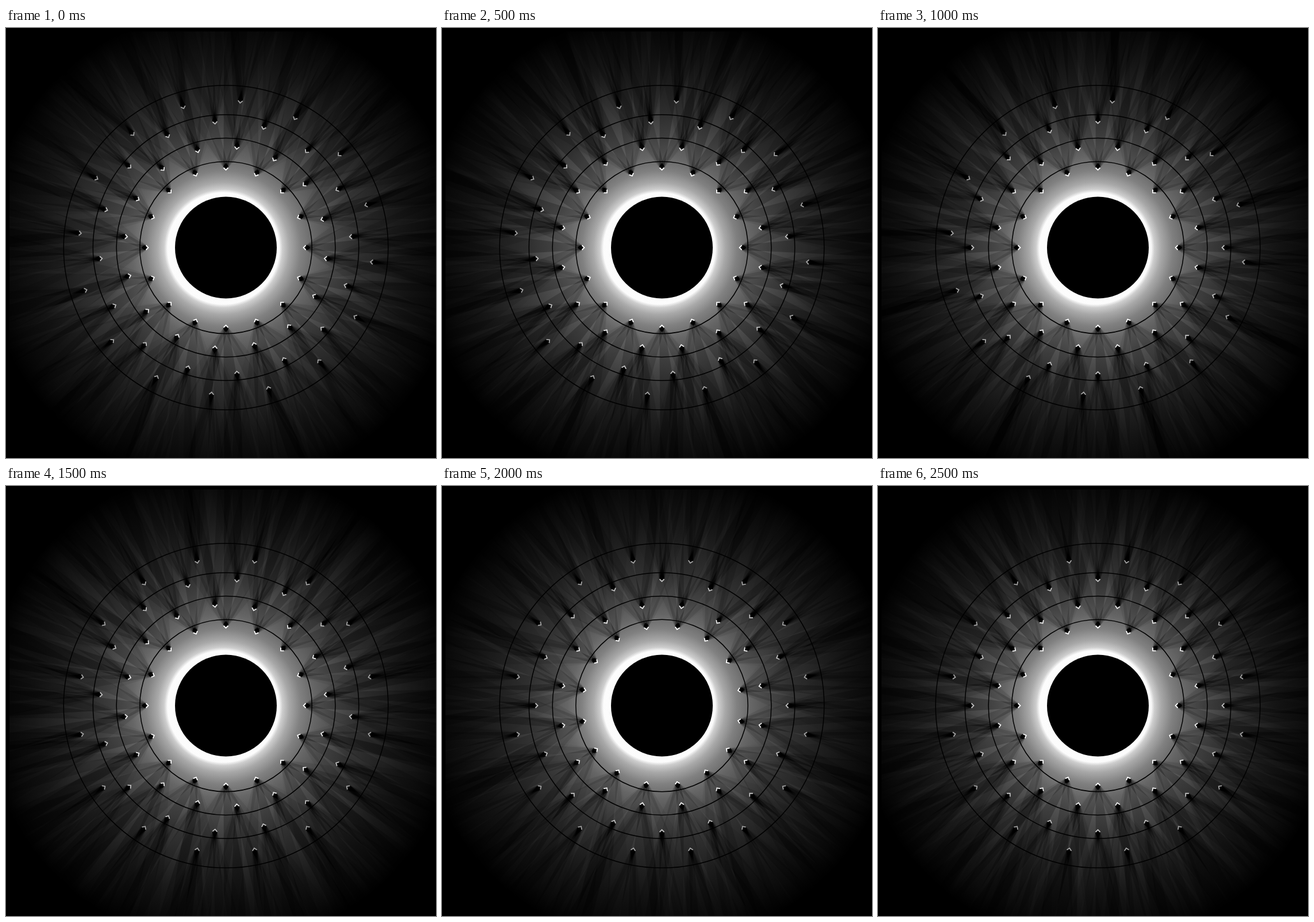
These frames come from a looping animation (748x748 px, 3 s). An HTML page with a canvas:

```html
<!DOCTYPE html>
<html>
<head>
<meta charset="utf-8">
<style>
html, body { margin: 0; width: 100%; height: 100%; overflow: hidden; background: #000; }
canvas { display: block; }
</style>
</head>
<body>
<canvas id="stage" width="748" height="748"></canvas>
<script>
const SIZE = 748, CX = 382.5, CY = 382, STEP = 500, COUNT = 16;
const DEG = Math.PI / 180;

// line: circle radius, tip: marker distance, turns: offset in degrees per step
const rings = [
  { line: 149.7, tip: 134.2, tone: '#fff', turns: [0, 0, 0, 0, 11.25, 0] },
  { line: 190.4, tip: 171.6, tone: '#ececec', turns: [6.25, 11.25, 11.25, -6.25, 11.25, 11.25] },
  { line: 231.2, tip: 215.2, tone: '#c0c0c0', turns: [-5, -5, 0, 5, 0, 0] },
  { line: 282.3, tip: 252, tone: '#a4a4a4', turns: [5.625, 5.625, 5.625, 11.25, 11.25, 11.25] }
];

// brightness of the glow by radius
const glow = [[0, 255], [97, 255], [103, 208], [115, 170], [135, 130], [160, 103],
  [190, 83], [231, 62], [282, 44], [330, 27], [375, 14], [415, 0]];

// point lights on the rim of the disc, each shining outward over a wide lobe
const LIGHTS = 24, GLOW_X = 378, GLOW_Y = 383.5, RIM = 88;
const LOBE = 60 / 360, PEAK = Math.floor(255 / (LIGHTS * LOBE));
const lights = Array.from({ length: LIGHTS }, (_, i) => {
  const a = i * 2 * Math.PI / LIGHTS;
  return { a, x: GLOW_X + RIM * Math.cos(a), y: GLOW_Y + RIM * Math.sin(a) };
});

function makeCanvas() {
  const c = document.createElement('canvas');
  c.width = c.height = SIZE;
  return c;
}

function fillAll(g, style, mode = 'source-over') {
  g.globalCompositeOperation = mode;
  g.fillStyle = style;
  g.fillRect(0, 0, SIZE, SIZE);
  g.globalCompositeOperation = 'source-over';
}

function circle(g, r) {
  g.beginPath();
  g.arc(CX, CY, r, 0, 2 * Math.PI);
}

function markersAt(step) {
  return rings.flatMap(({ tip, tone, turns }) =>
    Array.from({ length: COUNT }, (_, i) =>
      ({ tip, tone, angle: (turns[step] + i * 360 / COUNT) * DEG })));
}

// x runs across the marker, d is its distance from the centre
function place(angle, x, d) {
  const s = Math.sin(angle), c = Math.cos(angle);
  return [CX + x * c + d * s, CY + x * s - d * c];
}

function lobe(g, { a }) {
  const shade = g.createConicGradient(a, GLOW_X, GLOW_Y);
  const lit = `rgb(${PEAK},${PEAK},${PEAK})`;
  shade.addColorStop(0, lit);
  shade.addColorStop(LOBE, '#000');
  shade.addColorStop(1 - LOBE, '#000');
  shade.addColorStop(1, lit);
  return shade;
}

function castShadows(g, light, markers) {
  const far = ([x, y]) => [x + (x - light.x) * 16, y + (y - light.y) * 16];
  g.fillStyle = '#000';
  g.beginPath();
  for (const { angle, tip } of markers) {
    // only markers on the light's own side can shade its lobe
    if (Math.cos(angle - Math.PI / 2 - light.a) < 0.25) continue;
    const a = place(angle, -4.2, tip + 5), b = place(angle, 4.2, tip + 5);
    g.moveTo(...a);
    g.lineTo(...b);
    g.lineTo(...far(b));
    g.lineTo(...far(a));
    g.closePath();
  }
  g.fill();
}

const body = new Path2D('M0 -1L4 -5L3.6 -9L0 -12L-3.6 -9L-4 -5Z');
const tipLine = new Path2D('M-4 -4.8L0 -0.8L4 -4.8');

function drawMarker(g, { angle, tip, tone }) {
  g.save();
  g.translate(CX, CY);
  g.rotate(angle);
  g.translate(0, -tip);
  g.fillStyle = '#000';
  g.fill(body);
  g.strokeStyle = tone;
  g.lineWidth = 1.8;
  g.stroke(tipLine);
  g.restore();
}

const layer = makeCanvas(), lg = layer.getContext('2d');

function render(step) {
  const canvas = makeCanvas(), g = canvas.getContext('2d');
  const markers = markersAt(step);

  // add up how much of the light reaches each place
  fillAll(g, '#000');
  for (const light of lights) {
    fillAll(lg, lobe(lg, light));
    castShadows(lg, light, markers);
    g.globalCompositeOperation = 'lighter';
    g.drawImage(layer, 0, 0);
  }

  const edge = glow[glow.length - 1][0];
  const shade = g.createRadialGradient(GLOW_X, GLOW_Y, 0, GLOW_X, GLOW_Y, edge);
  for (const [r, v] of glow) shade.addColorStop(r / edge, `rgb(${v},${v},${v})`);
  fillAll(g, shade, 'multiply');

  g.strokeStyle = '#000';
  g.lineWidth = 1.5;
  for (const { line } of rings) {
    circle(g, line);
    g.stroke();
  }
  markers.forEach(m => drawMarker(g, m));

  g.fillStyle = '#000';
  circle(g, 88.5);
  g.fill();
  g.fillRect(0, 0, SIZE, 6);
  g.fillRect(0, 0, 6, SIZE);
  return canvas;
}

const steps = rings[0].turns.map((_, i) => render(i));
const stage = document.getElementById('stage').getContext('2d');
const start = performance.now();
let shown = -1;

function tick() {
  const step = Math.floor((performance.now() - start) / STEP) % steps.length;
  if (step !== shown) {
    stage.drawImage(steps[step], 0, 0);
    shown = step;
  }
  requestAnimationFrame(tick);
}
tick();
</script>
</body>
</html>
```
